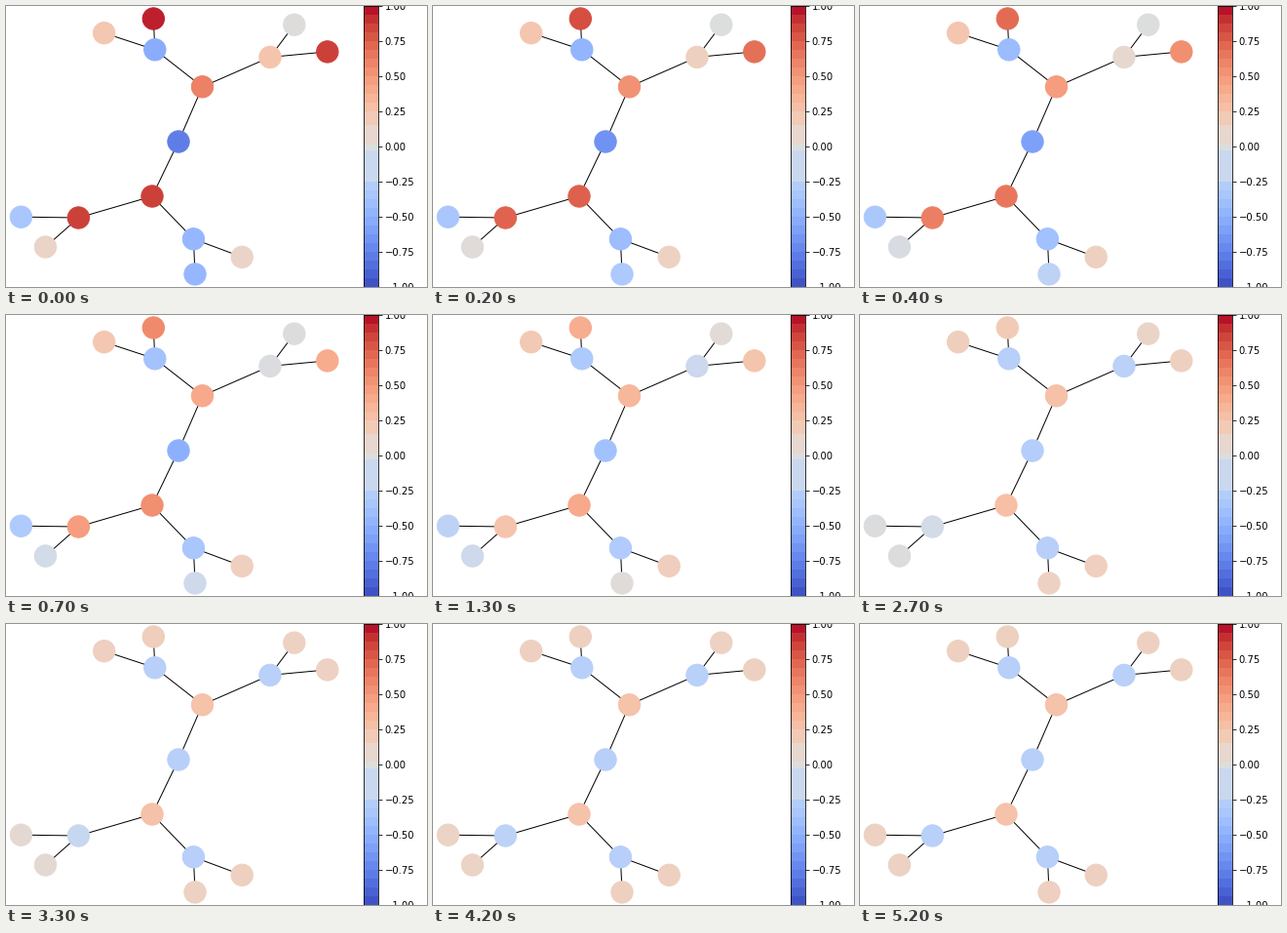
Write a matplotlib script that moves like this. It is 432 px wide and 288 px high and loops after 5300 ms.

```python
import matplotlib.pyplot as plt
import numpy as np
from matplotlib.animation import FuncAnimation

W, H, DPI = 432, 288, 72
FRAMES, INTERVAL = 53, 100
CMAP = plt.get_cmap("coolwarm")

# Binary tree in heap order: node k has children 2k+1 and 2k+2.
POS = np.array([
    (177, 139),
    (201.5, 82.8), (150, 195),
    (152.8, 44.8), (271, 52.4), (74.4, 217), (192.4, 238.8),
    (100.7, 27.7), (151.3, 13), (295.8, 19.2), (329.8, 46.9),
    (15.4, 216.2), (40.5, 247), (194, 274.9), (242.2, 257.3),
])
NODES = np.arange(len(POS))
PARENT = np.maximum((NODES - 1) // 2, 0)
DEPTH = np.log2(NODES + 1).astype(int)
LEAF = DEPTH == 3

START = np.array([-.77, .61, .86, -.52, .25, .86, -.45,
                  .23, .95, .01, .86, -.34, .11, -.45, .11])
REST = np.array([-.25, .26, -.25, .15])[DEPTH]
LEAF_TAU, LEAF_PULL = 10, 0.45


def simulate():
    """Every node relaxes to its rest value; leaves are also pushed by parents."""
    gap = START - REST
    tau = np.where(LEAF, LEAF_TAU, 9 + 6 * np.abs(gap) ** 3)
    pull = np.where(LEAF, LEAF_PULL, 0)
    frames = np.arange(FRAMES)
    clock = frames + (frames / 20) ** 4  # the tail settles faster
    path = [gap]
    for dt in np.diff(clock):
        gap = gap - dt * (gap + pull * gap[PARENT]) / tau
        path.append(gap)
    return REST + np.array(path)


COLORS = CMAP((simulate() + 1) / 2)


def draw_bar(fig):
    ax = fig.add_axes([0.85, 0, 14.4 / W, 1])
    step = 1 / 16
    edges = np.concatenate([
        np.arange(-1, -0.24, step),
        [-0.03, 0.02, 0.15],
        np.arange(0.25, 1.01, step),
    ])
    mids = (edges[1:] + edges[:-1]) / 2
    ax.pcolormesh([0, 1], edges, mids[:, None], cmap=CMAP, vmin=-1, vmax=1)
    ax.set(xlim=(0, 1), ylim=(-1, 1), xticks=[])
    ax.yaxis.tick_right()
    ax.set_yticks(np.linspace(-1, 1, 9))


plt.rcParams["font.family"] = "DejaVu Sans"
plt.rcParams["font.size"] = 10
fig = plt.figure(figsize=(W / DPI, H / DPI), dpi=DPI, facecolor="white")
ax = fig.add_axes([0, 0, 1, 1])
ax.set(xlim=(0, W), ylim=(H, 0))
ax.axis("off")
for k in NODES[1:]:
    ax.plot(*POS[[PARENT[k], k]].T, color="black", lw=1, zorder=1)
nodes = ax.scatter(*POS.T, s=500, c=COLORS[0], linewidths=1, zorder=2)
draw_bar(fig)


def update(i):
    nodes.set_facecolor(COLORS[i])
    nodes.set_edgecolor(COLORS[i])
    return [nodes]


anim = FuncAnimation(fig, update, frames=FRAMES, interval=INTERVAL,
                     repeat=True, repeat_delay=0)
plt.show()
```
